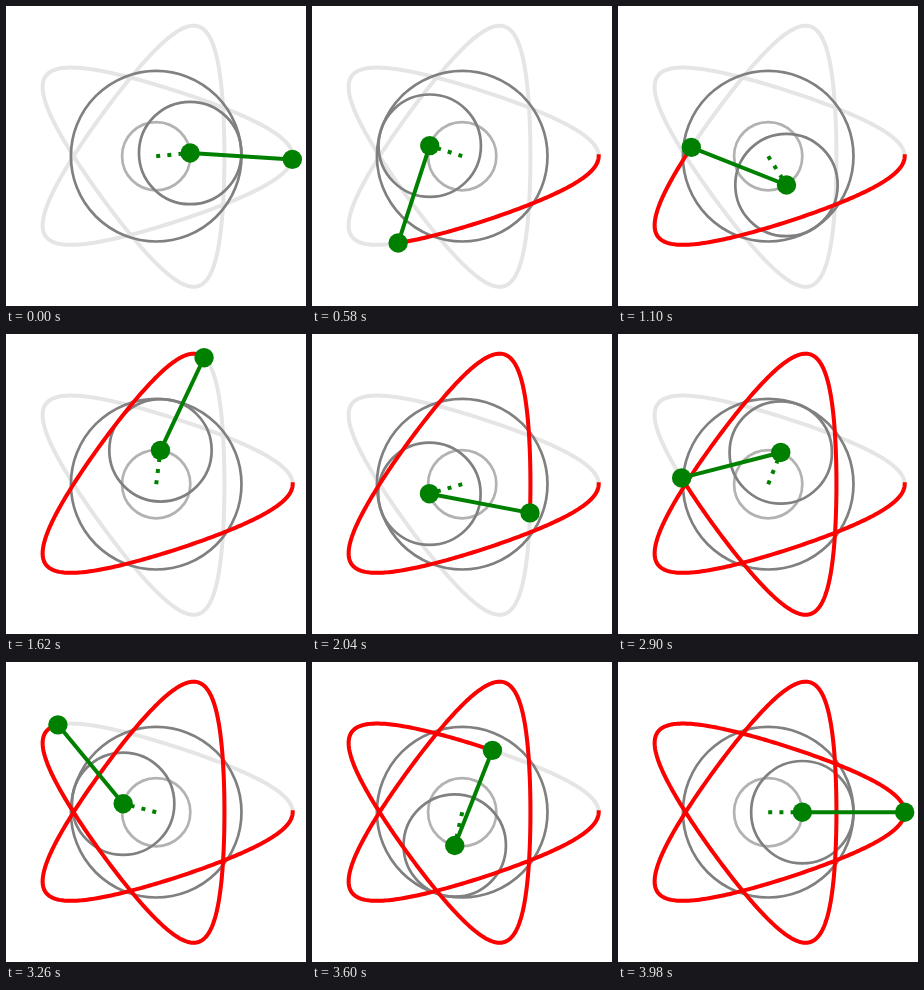
An HTML page that plays this animation: 300x300 px, repeating every 4000 ms.

```html
<!DOCTYPE html>
<html lang="en">
<head>
<meta charset="utf-8">
<title>Hypotrochoid</title>
<style>
  html, body { margin: 0; width: 100%; height: 100%; overflow: hidden; background: #fff; }
  svg { display: block; width: 100vw; height: 100vh; }
</style>
</head>
<body>
<svg viewBox="0 0 300 300" fill="none">
  <path id="guide" stroke="#e5e5e5" stroke-width="4" stroke-linejoin="round"/>
  <g stroke-width="2.7">
    <circle id="inner" stroke="#b2b2b2"/>
    <circle id="outer" stroke="#808080"/>
    <circle id="roller" stroke="#808080"/>
  </g>
  <path id="trace" stroke="#f00" stroke-width="4" stroke-linejoin="round" stroke-linecap="square"/>
  <g stroke="#008000" stroke-width="4">
    <path id="crank" stroke-dasharray="4 7.2"/>
    <path id="arm"/>
  </g>
  <g fill="#008000">
    <circle id="joint" r="9.7"/>
    <circle id="pen" r="9.7"/>
  </g>
</svg>
<script>
const LOOP = 4000, STEP = 20, STEPS = LOOP / STEP, SUB = 3;
const UNIT = 17.06, CENTER = { x: 150.2, y: 150.2 };
const FIXED = 5 * UNIT, ROLLING = 3 * UNIT, ARM = 6 * UNIT, CRANK = FIXED - ROLLING;

const el = id => document.getElementById(id);
const set = (id, attrs) => {
  for (const name in attrs) el(id).setAttribute(name, attrs[name]);
};
const place = (id, p) => set(id, { cx: p.x, cy: p.y });

const polar = (from, radius, angle) => ({
  x: from.x + radius * Math.cos(angle),
  y: from.y - radius * Math.sin(angle)
});
const line = points =>
  'M' + points.map(p => p.x.toFixed(2) + ' ' + p.y.toFixed(2)).join('L');

// Three turns of the crank close the curve.
function pose(step) {
  const angle = step / STEPS * 6 * Math.PI;
  const joint = polar(CENTER, CRANK, angle);
  return { joint, pen: polar(joint, ARM, -angle * CRANK / ROLLING) };
}

const curve = Array.from({ length: STEPS * SUB + 1 }, (_, i) => pose(i / SUB).pen);

set('guide', { d: line(curve) + 'Z' });
set('inner', { r: CRANK });
set('outer', { r: FIXED });
set('roller', { r: ROLLING });
place('inner', CENTER);
place('outer', CENTER);

function draw(time) {
  const step = Math.floor(time % LOOP / STEP) + 1;
  const { joint, pen } = pose(step);
  place('roller', joint);
  place('joint', joint);
  place('pen', pen);
  set('crank', { d: line([CENTER, joint]) });
  set('arm', { d: line([joint, pen]) });
  set('trace', { d: line(curve.slice(0, step * SUB + 1)) });
}

const start = performance.now();
function tick() {
  draw(performance.now() - start);
  requestAnimationFrame(tick);
}
tick();
</script>
</body>
</html>
```
